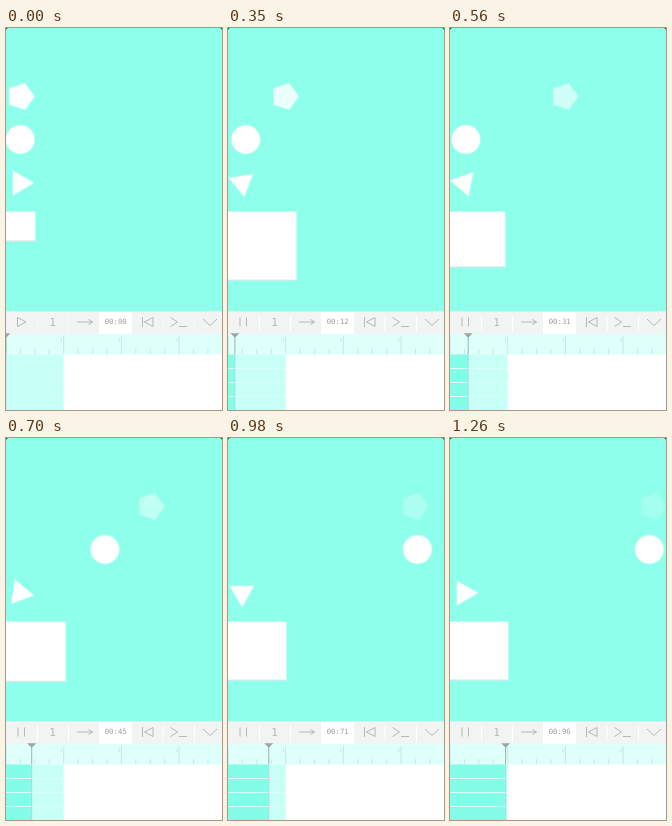
Animation, 216 px wide and 382 px high, one loop 1.33 s. Source, as an HTML page:

```html
<!DOCTYPE html>
<html lang="en">
<head>
<meta charset="utf-8">
<title>Timeline editor</title>
<style>
  html, body { margin: 0; width: 100%; height: 100%; overflow: hidden; background: #222; }
  svg { display: block; width: 100%; height: 100%; }
  text { font-family: "DejaVu Sans Mono", "Liberation Mono", monospace; text-anchor: middle; }
  .shape { fill: #fff; stroke: #fff; stroke-opacity: .35; stroke-width: 2; paint-order: stroke; }
  .icon { fill: none; stroke: #aeb2b2; stroke-width: .9; }
</style>
</head>
<body>
<svg viewBox="0 0 216 382" preserveAspectRatio="none">
  <rect width="216" height="382" rx="2.5" fill="#8effeb"/>

  <g class="shape">
    <polygon id="pentagon"/>
    <circle id="circle" cy="111.5" r="14"/>
    <polygon id="triangle"/>
    <rect id="square" y="184"/>
  </g>
  <path id="squareEdge" stroke="#c9dedb" stroke-width=".8"/>

  <rect y="283" width="216" height="23" fill="#f2f3f3"/>
  <path d="M0 283.5H216" stroke="#d5f5ef"/>
  <path id="dividers" d="M31.5 287V304M62.5 287V304M157 287V304M188.5 287V304" stroke="#fff"/>
  <rect x="93" y="284" width="33" height="22" fill="#fff"/>
  <g class="icon">
    <path id="play" d="M11.5 289.5L20 294L11.5 298.5Z"/>
    <path id="pause" d="M12 289.5V298.5M18.5 289.5V298.5"/>
    <path d="M71 294H86.5M82.5 291.5L86.5 294L82.5 296.5"/>
    <path d="M136.5 289V299M147 289.5V298.5L138.5 294Z"/>
    <path d="M164.5 289.5L171.5 294L164.5 298.5M173 298.5H181"/>
    <path d="M197 291L204 297.5L211 291"/>
  </g>
  <text x="46.5" y="298" font-size="11" fill="#b5b9b9">1</text>
  <text id="clock" x="109.7" y="296.3" font-size="7.3" fill="#9a9e9e"></text>

  <rect y="306" width="216" height="21" fill="#dffffa"/>
  <path id="ticks" stroke="#b5e6df" stroke-width=".8"/>
  <g id="labels" font-size="5" fill="#b5e6df"></g>

  <rect y="326.5" width="216" height="55.5" fill="#fff"/>
  <rect y="326.5" width="57.7" height="55.5" fill="#c8fff6"/>
  <rect id="played" y="326.5" height="55.5" fill="#83fce8"/>
  <path id="rows" d="M0 340.5H57.7M0 354.5H57.7M0 368.5H57.7" stroke="#d9fff9"/>
  <g id="playhead">
    <path d="M0 309V326" stroke="#94b5b0"/>
    <path d="M0 326V382" stroke="#a9d5cf" stroke-width=".8"/>
    <path d="M-4.5 305.2H4.5L0 309.8Z" fill="#9da5a4"/>
  </g>
</svg>
<script>
const STEP = 70, LOOP = 1330, SECOND = 57.7;
const el = id => document.getElementById(id);
const set = (id, attrs) => {
  for (const key in attrs) el(id).setAttribute(key, attrs[key]);
};
const mix = (a, b, k) => a + (b - a) * k;

const outQuad = t => 1 - (1 - t) ** 2;
const outElastic = t =>
  t ? 1 + 2 ** (-10 * t) * Math.sin((t - .075) * 2 * Math.PI / .3) : 0;
function outBounce(t) {
  const arc = (shift, floor) => 7.5625 * (t - shift / 2.75) ** 2 + floor;
  if (t < 1 / 2.75) return arc(0, 0);
  if (t < 2 / 2.75) return arc(1.5, .75);
  if (t < 2.5 / 2.75) return arc(2.25, .9375);
  return arc(2.625, .984375);
}
const inOutBounce = t =>
  t < .5 ? (1 - outBounce(1 - 2 * t)) / 2 : (1 + outBounce(2 * t - 1)) / 2;

function regular(sides, cx, cy, radius, turn = 0) {
  return Array.from({ length: sides }, (_, i) => {
    const a = 2 * Math.PI * (i / sides + turn);
    return `${cx + radius * Math.cos(a)},${cy + radius * Math.sin(a)}`;
  }).join(" ");
}

let tickPath = "";
for (let i = 0; i < 15; i++) {
  const major = i % 4 === 0;
  tickPath += `M${i * SECOND / 4} ${major ? 308 : 321}V326`;
  if (major && i) el("labels").innerHTML +=
    `<text x="${i * SECOND / 4 - 2.5}" y="314">${i / 4}</text>`;
}
set("ticks", { d: tickPath });

function render(ms) {
  const step = Math.floor(ms % LOOP / STEP);
  const playing = step > 3;
  const p = playing ? Math.min(.964, .1846 + .0652 * (step - 6)) : 0;
  const eased = outQuad(p);
  const size = mix(29, 58, outElastic(p));
  const x = p * SECOND;

  set("pentagon", {
    points: regular(5, mix(14.7, 202.7, eased), 68.5, 13.6),
    opacity: mix(1, .2, eased)
  });
  set("circle", { cx: mix(14.3, 200.3, inOutBounce(p)) });
  set("triangle", { points: regular(3, 14, 155, 13.5, eased) });
  set("square", { width: size, height: size });
  set("squareEdge", { d: `M0 ${184 + size}H${size}` });

  set("play", { opacity: playing ? 0 : 1 });
  set("pause", { opacity: playing ? 1 : 0 });
  el("clock").textContent = "00:" + String(Math.round(p * 100)).padStart(2, "0");
  set("played", { width: x });
  set("playhead", { transform: `translate(${x})` });
  set("rows", { opacity: step < 3 ? .3 : 1 });
  set("dividers", { opacity: step < 3 ? .5 : 1 });
}

const start = performance.now();
function tick() {
  render(performance.now() - start);
  requestAnimationFrame(tick);
}
tick();
</script>
</body>
</html>
```
